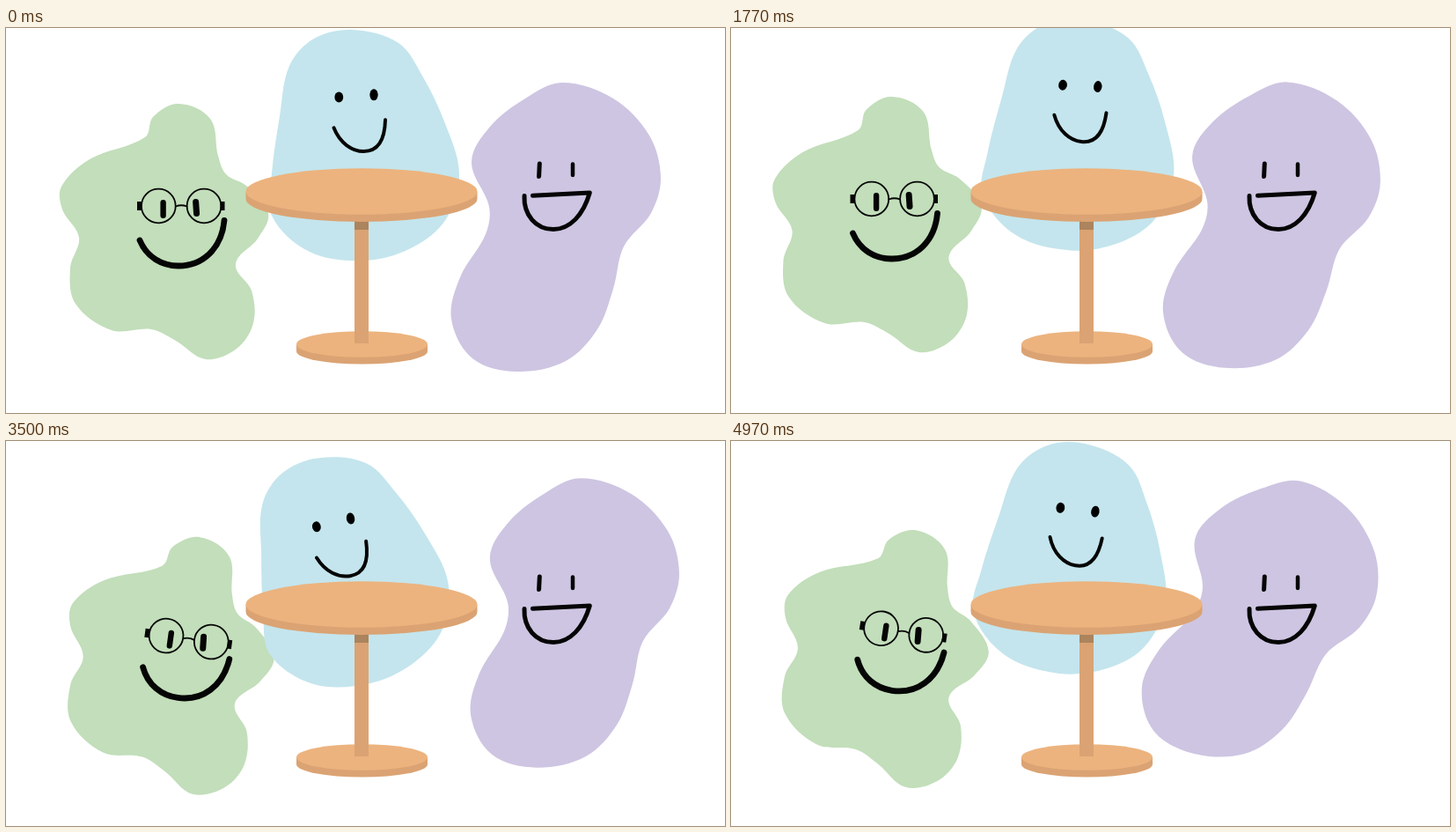
Animation of 817x437 px, one loop 5010 ms. Source, as an HTML page:

```html
<!DOCTYPE html>
<html lang="en">
<head>
<meta charset="utf-8">
<title>Blobs around a table</title>
<style>
  html, body { margin: 0; width: 100%; height: 100%; overflow: hidden; background: #fff; }
  svg { display: block; width: 100%; height: 100%; }
  .ink { fill: none; stroke: #050505; stroke-linecap: round; stroke-linejoin: round; }
</style>
</head>
<body>
<svg viewBox="0 0 817 437">
  <g id="purple"><path class="body" fill="#cec5e2"/></g>
  <g class="ink" stroke-width="5">
    <path d="M606.3 154L605.6 168.5"/>
    <path d="M644 154.5V167" stroke-width="4.5"/>
    <path d="M598.5 190.3L663.3 187C656 212 641 228.5 622 228.5C602 228.5 588 212 589 190.5"/>
  </g>
  <g id="green">
    <path class="body" fill="#c2deba"/>
    <g class="ink">
      <g stroke-width="1.8">
        <circle cx="173.3" cy="202" r="19.4"/>
        <circle cx="225" cy="202" r="19.4"/>
        <path d="M193 202.5Q199 200 205.5 202.5"/>
      </g>
      <path d="M152 241C160 260 177 270 196 270C224 270 245 250 248 218.5" stroke-width="6.8"/>
    </g>
    <g fill="#050505">
      <path d="M149 197h5v10h-5zM243.5 197h5v10h-5z"/>
      <rect x="175.4" y="195" width="6.4" height="21" rx="3.2"/>
      <rect x="212.6" y="194" width="7" height="20" rx="3.5" transform="rotate(-4 216 204)"/>
    </g>
  </g>
  <g id="blue">
    <path class="body" fill="#c4e5ed"/>
    <ellipse cx="378.3" cy="78.5" rx="4.9" ry="6"/>
    <ellipse cx="418" cy="75.8" rx="4.7" ry="6.5"/>
    <path class="ink" stroke-width="4" d="M372.5 113.3C379.5 131 393.5 140 406.5 140C424.5 140 430.5 124 431 104.3"/>
  </g>
  <g fill="#dba373">
    <path d="M330 359v8a74.5 14.5 0 0 0 149 0v-8z"/>
    <ellipse cx="404.5" cy="359" rx="74.5" ry="14.8" fill="#ecb37e"/>
    <path d="M396 215h16v143h-16z"/>
    <path d="M396 215h16v14h-16z" fill="#ac845d"/>
    <path d="M272.5 186v8a131.5 26 0 0 0 263 0v-8z"/>
    <ellipse cx="404" cy="185.5" rx="131.5" ry="26.3" fill="#ecb37e"/>
  </g>
</svg>
<script>
const LOOP = 5010, RATE = 30;
const keyTicks = [0, 16, 53, 86, 105, 122, 149];

// poses: [dx, dy, degrees] at each key tick; drift: how far a long move bows out on its way.
const blobs = {
  purple: {
    pivot: [630, 230],
    drift: [22, 32],
    outline: [[632,62], [690,80], [731,122], [744,170], [733,210], [702,248], [690,296], [672,342],
      [636,378], [580,390], [530,375], [506,330], [516,283], [545,234], [549,203], [529,152],
      [550,112], [590,80]],
    poses: [[0,0,0], [1,27,12.9], [-9.5,-1,3.3], [-4.5,-19,9.1], [21.4,-19.7,-.4], [-26,9,14.8],
      [-20.7,-20.8,12.3]]
  },
  green: {
    pivot: [199, 202],
    drift: [-12, 6],
    outline: [[196,86], [232,103], [241,145], [250,166], [273,179], [298,210], [286,239], [261,268],
      [279,298], [281,335], [262,364], [227,376], [193,355], [165,342], [120,343], [79,313],
      [73,272], [83,238], [64,206], [63,180], [95,149], [158,124], [167,101]],
    poses: [[0,0,0], [-9.5,-14,5.4], [-13.5,-8,0], [0,19.5,-5.5], [8.5,22.5,7.8], [15.2,8.3,3],
      [-3,14.5,8.5]]
  },
  blue: {
    pivot: [398, 77],
    drift: [0, -4],
    outline: [[393,2], [446,17], [474,56], [498,106], [515,165], [500,217], [462,249], [408,264],
      [345,254], [302,213], [302,165], [311,100], [322,43], [350,12]],
    poses: [[0,0,0], [-4.7,1.5,-6.5], [-1.2,-11.5,6.5], [-25,-17,-7.5], [-26,15.5,-9.7],
      [12.3,18,-8.1], [-4,.8,10.1]]
  }
};

// Smooth closed curve; each handle is a third of its segment's length.
function closedPath(points) {
  const n = points.length, at = i => points[(i + n) % n];
  const distance = (p, q) => Math.hypot(q[0] - p[0], q[1] - p[1]);
  const handle = (i, length) => {
    const from = at(i - 1), to = at(i + 1), scale = length / 3 / distance(from, to);
    return at(i).map((v, k) => v + (to[k] - from[k]) * scale);
  };
  const curves = points.map((p, i) => {
    const length = distance(p, at(i + 1));
    return `C${handle(i, length)} ${handle(i + 1, -length)} ${at(i + 1)}`;
  });
  return `M${points[0]}${curves.join('')}Z`;
}

function poseAt({ poses, drift }, tick) {
  const last = keyTicks.length - 1;
  let i = 0;
  while (i < last - 1 && tick >= keyTicks[i + 1]) i++;
  const span = keyTicks[i + 1] - keyTicks[i], u = (tick - keyTicks[i]) / span;
  const bow = Math.sin(Math.PI * u) ** 2 * (span - keyTicks[1]) / 17;
  const slope = (j, k) => {
    const lo = Math.max(j - 1, 0), hi = Math.min(j + 1, last);
    return (poses[hi][k] - poses[lo][k]) / (keyTicks[hi] - keyTicks[lo]) * span;
  };
  return poses[i].map((p, k) => {
    const q = poses[i + 1][k], m = slope(i, k), w = slope(i + 1, k);
    const spline = p + u * (m + u * (3 * (q - p) - 2 * m - w + u * (2 * (p - q) + m + w)));
    return spline + bow * (drift[k] || 0);
  });
}

for (const [id, blob] of Object.entries(blobs)) {
  blob.node = document.getElementById(id);
  blob.node.querySelector('.body').setAttribute('d', closedPath(blob.outline));
}

function draw(ms) {
  const tick = Math.floor(ms % LOOP / 1000 * RATE + .2);
  for (const blob of Object.values(blobs)) {
    const [x, y, angle] = poseAt(blob, Math.min(tick, keyTicks.at(-1)));
    blob.node.setAttribute('transform', `translate(${x} ${y}) rotate(${angle} ${blob.pivot})`);
  }
}

const start = performance.now();
function loop() {
  draw(performance.now() - start);
  requestAnimationFrame(loop);
}
loop();
</script>
</body>
</html>
```
